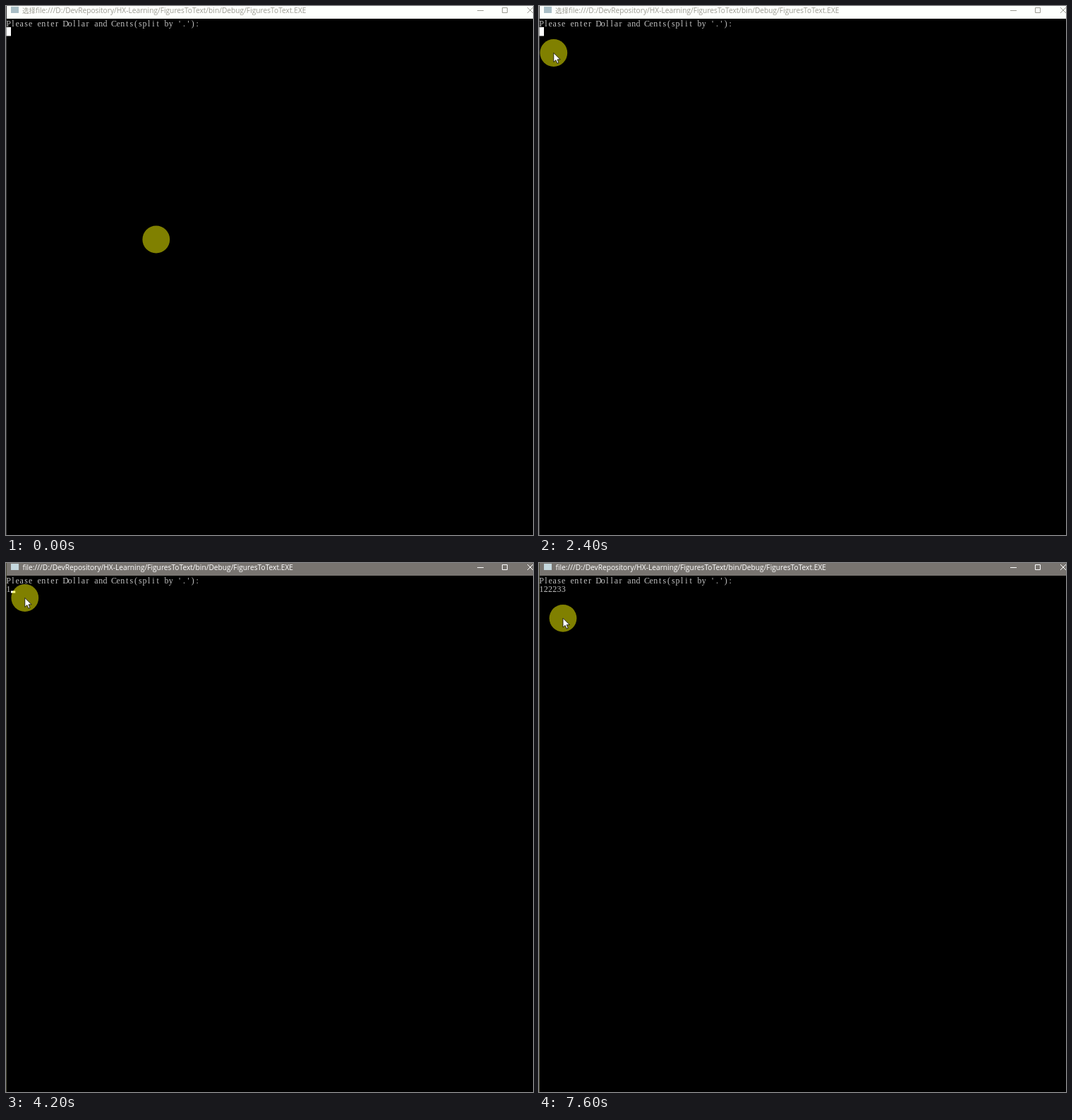
An HTML page with a canvas for the animation above (8 s loop, 747x750 px).

```html
<!DOCTYPE html>
<html lang="en">
<head>
<meta charset="utf-8">
<title>Console</title>
<style>
html, body { margin: 0; height: 100%; overflow: hidden; background: #000; }
canvas { display: block; }
</style>
</head>
<body>
<canvas id="stage" width="747" height="750"></canvas>
<script>
const ctx = document.getElementById('stage').getContext('2d');
const LOOP = 8000, TICK = 200, CELL = 6.22, ROW = 12.2;
const PROMPT = "Please enter Dollar and Cents(split by '.'):";
const PATH = 'file:///D:/DevRepository/HX-Learning/FiguresToText/bin/Debug/FiguresToText.EXE';

// pointer: time, x, y
const moves = [
  [0, 212.8, 331], [1800, 212.8, 331], [2400, 20.8, 66.5],
  [2800, 9, 38], [3000, 7, 34], [3400, 7, 41], [3800, 7, 41],
  [4200, 26.8, 49.5], [4600, 42, 80], [4800, 42, 80], [5200, 34, 78.3], [LOOP, 34, 78.3]
];
// input line: time, typed text, caret shown
const typing = [
  [0, '', true], [4200, '1', true], [4600, '1', false], [5000, '1', true],
  [5600, '1', false], [5800, '12', true], [6000, '122', true], [6200, '1222', true],
  [6600, '1222', false], [7200, '12223', true], [7400, '122233', true], [7600, '122233', false]
];

function rect(color, x, y, w, h) {
  ctx.fillStyle = color;
  ctx.fillRect(x, y, w, h);
}

function pointerAt(t) {
  const i = moves.findIndex(m => m[0] > t);
  const [t0, x0, y0] = moves[i - 1], [t1, x1, y1] = moves[i];
  const k = (t - t0) / (t1 - t0);
  return [x0 + (x1 - x0) * k, y0 + (y1 - y0) * k];
}

function titleBar(active, selecting) {
  const ink = active ? '#fff' : '#9b9b92';
  rect(active ? '#787470' : '#fdfffc', 0, 0, 747, 18);
  rect(active ? '#c5d8df' : '#a9bec6', 7, 1, 11, 9);
  ctx.fillStyle = ctx.strokeStyle = ink;
  ctx.textAlign = 'left';
  if (selecting) {
    ctx.font = '9.5px "Noto Sans CJK SC", "Noto Sans CJK", sans-serif';
    ctx.fillText('选择', 23, 9.5);
  }
  ctx.font = '10.2px "Open Sans", sans-serif';
  ctx.fillText(PATH, selecting ? 42 : 23.5, 9.5);

  ctx.lineWidth = 1;
  ctx.beginPath();
  ctx.moveTo(668, 6.5);
  ctx.lineTo(677, 6.5);
  ctx.rect(703.5, 2.5, 7, 7);
  ctx.moveTo(739, 2);
  ctx.lineTo(747, 10);
  ctx.moveTo(747, 2);
  ctx.lineTo(739, 10);
  ctx.stroke();
}

// one glyph per console cell
function consoleLine(text, row) {
  ctx.fillStyle = '#c0c0c0';
  ctx.font = '12px "Liberation Serif", serif';
  ctx.textAlign = 'center';
  [...text].forEach((c, i) => ctx.fillText(c, 0.5 + (i + 0.5) * CELL, 29 + row * ROW));
}

function pointer(x, y, arrow) {
  ctx.fillStyle = 'rgba(255,255,0,.5)';
  ctx.beginPath();
  ctx.arc(x, y, 19.4, 0, Math.PI * 2);
  ctx.fill();
  if (!arrow) return;
  ctx.save();
  ctx.translate(x, y);
  ctx.scale(0.78, 0.78);
  const shape = new Path2D('M0 0V16.5L4 13L6.5 19L9.2 18L6.7 12H12Z');
  ctx.fillStyle = '#fff';
  ctx.strokeStyle = '#000';
  ctx.fill(shape);
  ctx.stroke(shape);
  ctx.restore();
}

function draw(t) {
  const active = t >= 3200, selecting = t < 3600;
  const [, text, caret] = typing.findLast(s => s[0] <= t);
  rect('#000', 0, 0, 747, 750);
  titleBar(active, selecting);
  rect(active ? '#4c4c38' : '#3c3c3c', 0, 0, 1, 750);
  consoleLine(PROMPT, 0);
  consoleLine(text, 1);
  if (selecting) rect('#fff', 0.5, 30, 6.5, 12.5);
  else if (caret) rect('#fff', 0.8 + text.length * CELL, 39.5, CELL, 3);
  pointer(...pointerAt(t), t >= 1000);
}

function frame(now) {
  draw(Math.floor((now % LOOP) / TICK) * TICK);
  requestAnimationFrame(frame);
}
requestAnimationFrame(frame);
</script>
</body>
</html>
```
